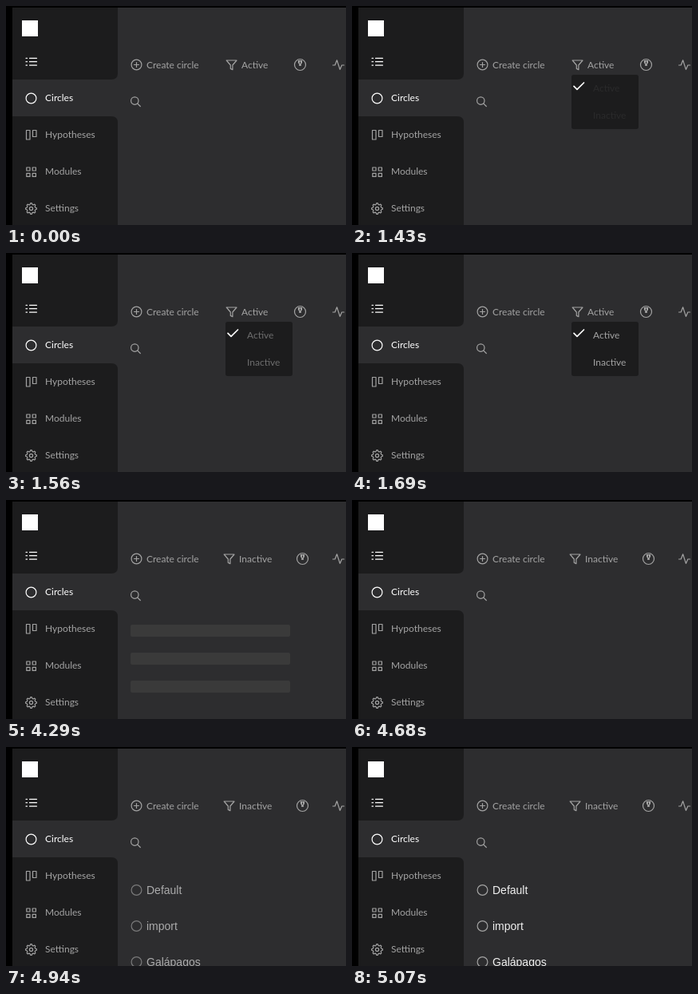
An HTML page that plays this animation: 426 px wide and 274 px high, repeating every 7.8 s.

```html
<!DOCTYPE html>
<html lang="en">
<head>
<meta charset="utf-8">
<title>Circles</title>
<style>
  html, body { margin: 0; width: 100%; height: 100%; overflow: hidden; background: #000; }
  svg { display: block; width: 426px; height: 274px; }
  text { font: 12px Lato, sans-serif; fill: #a3a3a3; }
  .icon { fill: none; stroke: #a3a3a3; stroke-width: 1.2; stroke-linecap: round; stroke-linejoin: round; }
  .on { stroke: #fff; }
  text.on { fill: #fff; stroke: none; }
  .panel { fill: #1c1c1d; }
  .list text { font: 14px "Liberation Sans", Arial, sans-serif; fill: #f0f0f0; }

  .before, .after, .menu, .options, .skeleton, .list { animation: 7800ms step-end infinite; }
  .before { animation-name: before; }
  .after { animation-name: after; }
  .menu { animation-name: menu; }
  .options { animation-name: options; }
  .skeleton { animation-name: skeleton; }
  .list { animation-name: list; }

  @keyframes before { 0% { opacity: 1 } 55%, 100% { opacity: 0 } }
  @keyframes after { 0% { opacity: 0 } 55%, 100% { opacity: 1 } }
  @keyframes menu { 0% { opacity: 0 } 18.3333% { opacity: 1 } 55%, 100% { opacity: 0 } }
  @keyframes options { 0% { opacity: .1 } 20% { opacity: .6 } 21.6666%, 100% { opacity: 1 } }
  @keyframes skeleton { 0% { opacity: 0 } 55% { opacity: 1 } 60%, 100% { opacity: 0 } }
  @keyframes list {
    0% { opacity: 0 } 61.6666% { opacity: .15 } 63.3333% { opacity: .65 } 65%, 100% { opacity: 1 }
  }
</style>
</head>
<body>
<svg viewBox="0 0 426 274">
  <defs>
    <path id="funnel" d="M0 0H12.8L7.7 6V11.7L5.1 10.4V6Z"/>
    <g id="badge">
      <circle r="7"/>
      <path d="M-2.6 -5.4H2.6V-2.6L1.3 -.8V1.6H-1.3V-.8L-2.6 -2.6Z" fill="#a3a3a3" stroke="none"/>
      <path d="M0 -3.8V-1.8" stroke="#2d2d2f" stroke-width="1"/>
    </g>
  </defs>

  <rect x="8" y="2" width="418" height="272" fill="#2d2d2f"/>
  <path class="panel" d="M8 2H140V84Q140 92 132 92H8Z"/>
  <path class="panel" d="M8 138H132Q140 138 140 146V274H8Z"/>
  <rect x="20" y="18" width="20" height="20" fill="#fff"/>

  <!-- sidebar -->
  <path class="icon on" stroke-width="1.4" d="M25 65.3H26.5M29.5 65.3H38.5M25 69.7H26.5M29.5 69.7H38.5M25 74.1H26.5M29.5 74.1H38.5"/>
  <circle class="icon on" cx="31.5" cy="115.5" r="6.4"/>
  <g class="icon">
    <path d="M25.5 155.5H30V167H25.5ZM33.5 155.5H38V163.5H33.5Z"/>
    <path d="M25.8 202H30V206H25.8ZM33.2 202H37.4V206H33.2ZM25.8 209.4H30V213.4H25.8ZM33.2 209.4H37.4V213.4H33.2Z"/>
    <path id="gear" transform="translate(31.5 253.5)"/>
    <circle cx="31.5" cy="253.5" r="2.1"/>
  </g>
  <text class="on" x="49" y="119">Circles</text>
  <text x="49" y="165">Hypotheses</text>
  <text x="49" y="211">Modules</text>
  <text x="49" y="257">Settings</text>

  <!-- toolbar -->
  <g class="icon">
    <circle cx="163.5" cy="73.5" r="6.4"/>
    <path d="M160.5 73.5H166.5M163.5 70.5V76.5"/>
    <path d="M409.5 74H412.2L414.6 67.8L418.4 79.4L420.8 74H423.6"/>
    <circle cx="161.3" cy="118.6" r="4.7"/>
    <path d="M164.8 122.1L168.3 125.5"/>
  </g>
  <text x="176" y="78">Create circle</text>
  <g class="before">
    <g class="icon">
      <use href="#funnel" x="276.2" y="68"/>
      <use href="#badge" x="368.5" y="73.5"/>
    </g>
    <text x="295" y="78">Active</text>
  </g>
  <g class="after">
    <g class="icon">
      <use href="#funnel" x="273.2" y="68"/>
      <use href="#badge" x="371.5" y="73.5"/>
    </g>
    <text x="292" y="78">Inactive</text>
  </g>

  <!-- content -->
  <g class="skeleton" fill="#3a3a3a">
    <rect x="156" y="156" width="200" height="15" rx="2"/>
    <rect x="156" y="191" width="200" height="15" rx="2"/>
    <rect x="156" y="226" width="200" height="15" rx="2"/>
  </g>
  <g class="list">
    <g class="icon">
      <circle cx="163.5" cy="179" r="6.4"/>
      <circle cx="163.5" cy="224" r="6.4"/>
      <circle cx="163.5" cy="269" r="6.4"/>
    </g>
    <text x="176" y="184">Default</text>
    <text x="176" y="229">import</text>
    <text x="176" y="274">Galápagos</text>
  </g>
  <g class="menu">
    <rect class="panel" x="275" y="86" width="84" height="68" rx="3"/>
    <path class="icon on" style="stroke-width:1.7" d="M278 100.3L282 104.3L290.5 96"/>
    <g class="options">
      <text x="302" y="107">Active</text>
      <text x="302" y="141">Inactive</text>
    </g>
  </g>
</svg>
<script>
  // Eight teeth: two outer points, then two inner points each
  const teeth = Array.from({ length: 32 }, (_, i) => {
    const angle = (i - 0.5) * Math.PI / 16;
    const radius = i % 4 < 2 ? 6.9 : 5.3;
    return `${(radius * Math.sin(angle)).toFixed(2)} ${(-radius * Math.cos(angle)).toFixed(2)}`;
  });
  document.getElementById('gear').setAttribute('d', `M${teeth.join('L')}Z`);
</script>
</body>
</html>
```
